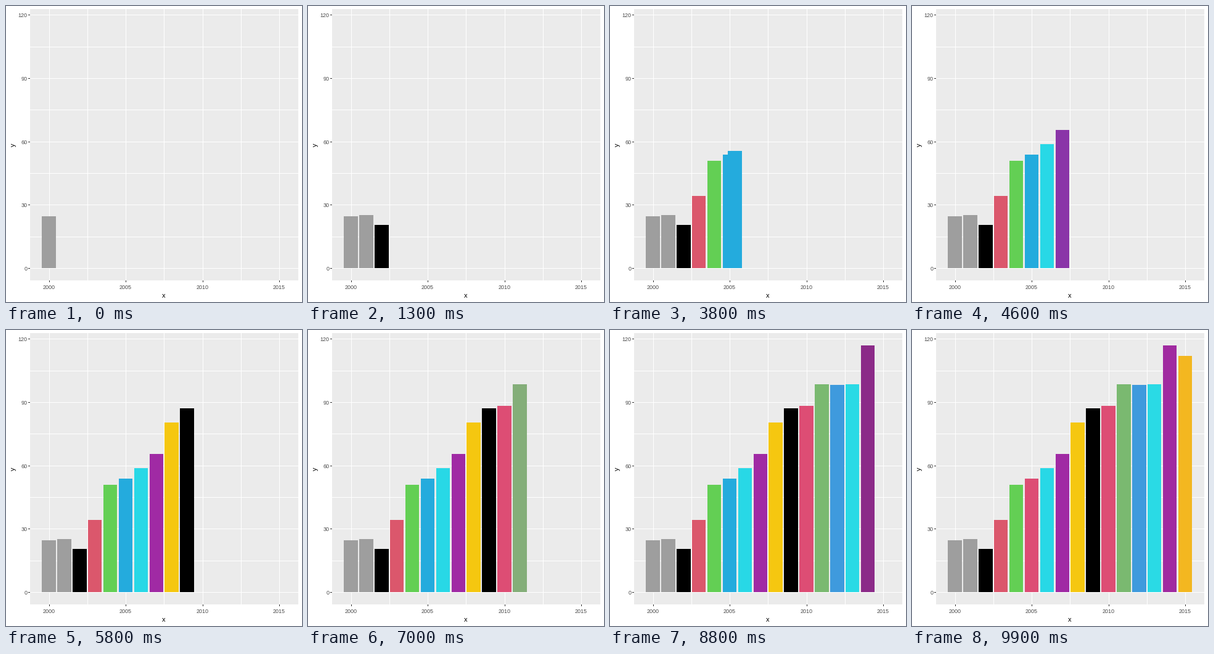
Write a matplotlib script that moves like this. It is 480 px wide and 480 px high and loops after 10 s.

```python
from math import floor

import matplotlib.pyplot as plt
from matplotlib.animation import FuncAnimation
from matplotlib.patches import Rectangle

SIZE, DPI = 480, 100
FRAMES, INTERVAL = 100, 100
STEPS = 3                       # frames per transition
X0, X_UNIT = 70.0, 24.9         # pixel of year 2000, pixels per year
Y0, Y_UNIT = 425.4, 3.421       # pixel of zero, pixels per unit
HALF = 0.45 * X_UNIT

VALUES = [24.5, 25.1, 20.4, 34.2, 50.9, 53.8, 58.7, 65.5,
          80.4, 87.1, 88.3, 98.5, 98.2, 98.5, 116.9, 112.0]
COUNT = len(VALUES)
CODES = [0, 0] + [1, 2, 3, 4, 5, 6, 7] * 2
SHADES = ["#9e9e9e", "#9e9e9e", "#000000", "#db576c", "#63cf54", "#24abdd",
          "#28d8e6", "#8a35a8", "#f5c710", "#000000", "#dd4d74", "#84ae79",
          "#3f9add", "#2adae5", "#8b2a88", "#f3b720"]
SETTLED = {7: "#a02aa4", 11: "#7ab970", 14: "#a02aa0"}
STARTS = [4 + 6 * i + min(i, 4) for i in range(COUNT)]

fig = plt.figure(figsize=(SIZE / DPI, SIZE / DPI), dpi=DPI, facecolor="white")
ax = fig.add_axes([0, 0, 1, 1])
ax.set_xlim(0, SIZE)
ax.set_ylim(SIZE, 0)
ax.axis("off")


def px(year):
    return X0 + X_UNIT * year


def py(value):
    return Y0 - Y_UNIT * value


def box(x, y, w, h, color, z=1):
    patch = Rectangle((x, y), w, h, facecolor=color, linewidth=0,
                      antialiased=False, zorder=z)
    return ax.add_patch(patch)


def label(x, y, text, size, color, **kw):
    ax.text(x, y, text, fontsize=size * 72 / DPI, color=color,
            family="Liberation Sans", **kw)


def draw_axes():
    left, top, right, bottom = 39, 5, 474, 445
    box(left, top, right - left, bottom - top, "#ebebeb", 0)
    for i in range(7):
        x = floor(px(2.5 * i))
        box(x, top, 1, bottom - top, "white")
        if i % 2 == 0:
            box(x, bottom, 1, 3, "#333333")
            label(x, 459, str(2000 + 5 * i // 2), 9, "#4d4d4d",
                  ha="center", va="baseline")
    for i in range(9):
        y = floor(py(15 * i))
        box(left, y, right - left, 1, "white")
        if i % 2 == 0:
            box(left - 3, y, 3, 1, "#333333")
            label(34.3, y + 4, str(15 * i), 9, "#4d4d4d",
                  ha="right", va="baseline")
    label(256, 473, "x", 11, "black", ha="center", va="baseline")
    label(12, 225.5, "y", 11, "black", ha="center", va="center", rotation=90)


def place(bar, year, value, color):
    x1, x2 = floor(px(year) - HALF), floor(px(year) + HALF)
    top = floor(py(value))
    bar.set_bounds(x1, top, x2 - x1, floor(Y0) - top)
    bar.set_facecolor(color)


def mix(a, b, step):
    return a + (b - a) * step / STEPS


def moving_color(src, dst, step):
    if step == STEPS:
        return SHADES[dst]
    code = (CODES[src] * (STEPS - step) + CODES[dst] * step) // STEPS
    if code == 0:
        return SHADES[0]
    return SHADES[code + (8 if src > 8 else 1)]


draw_axes()
bars = [box(0, 0, 0, 0, "black", 2) for _ in range(COUNT)]
mover = box(0, 0, 0, 0, "black", 3)


def update(frame):
    done = sum(start <= frame for start in STARTS)
    for i, bar in enumerate(bars):
        bar.set_visible(i < done)
        color = SETTLED.get(i, SHADES[i]) if done >= i + 2 else SHADES[i]
        place(bar, i, VALUES[i], color)
    if done == 0:
        place(mover, 0, VALUES[0], SHADES[0])
    else:
        src, dst = done - 1, done % COUNT
        step = min(frame - STARTS[src] + 1, STEPS)
        place(mover, mix(src, dst, step), mix(VALUES[src], VALUES[dst], step),
              moving_color(src, dst, step))
    return bars + [mover]


anim = FuncAnimation(fig, update, frames=FRAMES, interval=INTERVAL,
                     init_func=lambda: update(0), repeat=True,
                     repeat_delay=0, blit=False)
plt.show()
```
